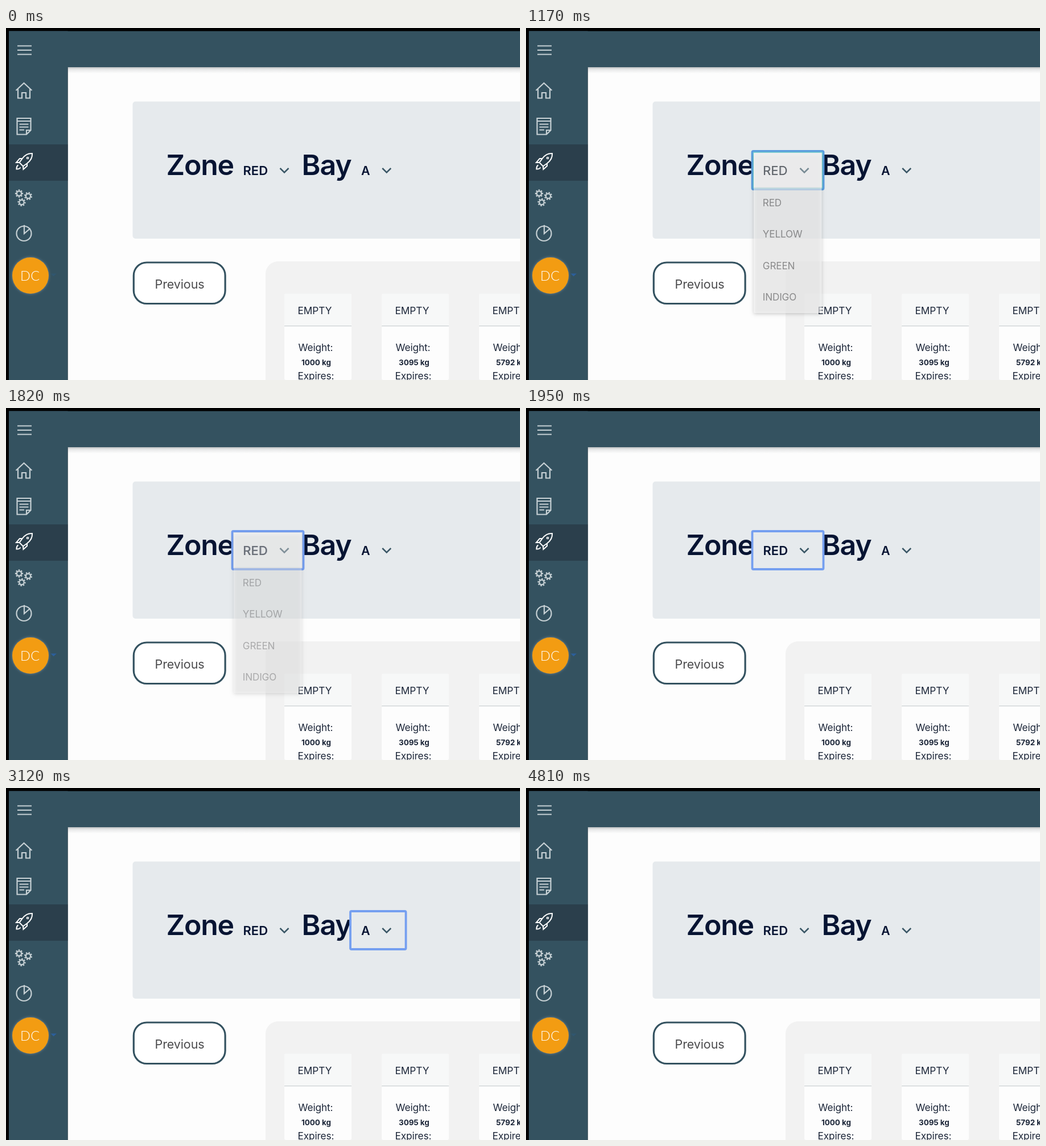
These frames come from a looping animation (903 by 620 pixels, 4940 ms). An HTML page with a canvas:

```html
<!DOCTYPE html>
<html lang="en">
<head>
<meta charset="utf-8">
<title>Zone and bay picker</title>
<style>
  html, body { margin: 0; width: 100%; height: 100%; overflow: hidden; background: #000; }
  canvas { display: block; }
</style>
</head>
<body>
<canvas id="stage" width="903" height="620"></canvas>
<script>
const ctx = document.getElementById('stage').getContext('2d');
const LOOP = 4940;
const TEAL = '#345260', NAVY = '#071433', INK = '#1b2538', ICON = '#c6d0d4', PANEL = '#e6eaed';
const SANS = 'Inter, "Open Sans", sans-serif';

function box(x, y, w, h, color, r = 0) {
  ctx.fillStyle = color;
  ctx.beginPath();
  ctx.roundRect(x, y, w, h, r);
  ctx.fill();
}

function frame(x, y, w, h, color, width, r = 0) {
  ctx.strokeStyle = color;
  ctx.lineWidth = width;
  ctx.beginPath();
  ctx.roundRect(x, y, w, h, r);
  ctx.stroke();
}

function line(d, color, width = 2) {
  ctx.strokeStyle = color;
  ctx.lineWidth = width;
  ctx.stroke(new Path2D(d));
}

function ring(x, y, r, color, width) {
  ctx.strokeStyle = color;
  ctx.lineWidth = width;
  ctx.beginPath();
  ctx.arc(x, y, r, 0, Math.PI * 2);
  ctx.stroke();
}

function text(s, x, y, size, color, weight = 400, tracking = 0, family = SANS) {
  ctx.font = `${weight} ${size}px ${family}`;
  ctx.letterSpacing = tracking + 'px';
  ctx.fillStyle = color;
  ctx.fillText(s, x, y);
}

// x is the left edge of the visible ink
function inkText(s, x, y, size, color, weight, tracking = 0, family = SANS) {
  ctx.font = `${weight} ${size}px ${family}`;
  ctx.letterSpacing = tracking + 'px';
  text(s, x + ctx.measureText(s).actualBoundingBoxLeft, y, size, color, weight, tracking, family);
}

function chevron(x) {
  line(`M${x - 7.5} 247 L${x} 254.5 L${x + 7.5} 247`, '#3c5867', 2.5);
}

function gear(x, y, turn) {
  ring(x, y, 4.1, ICON, 2.2);
  for (let i = 0; i < 8; i++) {
    const a = turn + i * Math.PI / 4, c = Math.cos(a), s = Math.sin(a);
    line(`M${x + c * 5} ${y + s * 5} L${x + c * 7.1} ${y + s * 7.1}`, ICON, 2.6);
  }
}

function icons() {
  for (const y of [31.5, 39, 46.5]) line(`M20 ${y} H45`, ICON, 2);
  line('M17.5 110 L31.5 97 L45.5 110 M21 107.5 V123.5 H28 V114 H35 V123.5 H42 V107.5', ICON, 2.2);
  line('M19.5 159 H43.5 V180 L36 187.5 H19.5 Z M19.5 164 H43.5 M36 187 V180 H43', ICON, 2.2);
  line('M23.5 169.5 H39.5 M23.5 174.5 H39.5 M23.5 179.5 H32', ICON);

  line('M46 221 C39 220.5 33 224 29 229.5 L23.5 237 L30 243.5 L37 238.5 C43 234 46.5 228 46 221 Z', '#fff');
  line('M29 230 H24 L18 237 L23.5 237 M37 238.5 V243 L30.5 249 L30 243.5', '#fff');
  line('M21.5 241.5 C18.5 243 18.5 246 18.5 248.5 C21.5 248.5 24.5 248 25.5 245.5', '#fff');
  ring(38, 229, 1.6, '#fff', 1.5);

  gear(23, 291.5, 0);
  gear(39, 296, .3);
  gear(27.5, 307, .15);

  ring(31.5, 362, 13, ICON, 2.2);
  line('M32 347 V362 L42.5 353', ICON, 2.2);
}

function sidebar(active) {
  box(5, 5.5, 103.5, 615, TEAL);
  box(5, 205, 103.5, 64, '#2b3f4c');
  icons();
  ctx.save();
  ctx.shadowColor = 'rgba(160,175,190,.6)';
  ctx.shadowBlur = 4;
  box(11, 404, 64, 64, '#f39c12', 32);
  ctx.restore();
  inkText('DC', 27, 444.7, 23.5, '#fff', 300, .5, 'Lato, sans-serif');
  ctx.fillStyle = active ? '#2c5f9c' : '#30566f';
  ctx.fill(new Path2D('M78.5 432.5 H89 L83.5 437.5 Z'));
}

function card(x, weight) {
  box(x, 468, 118, 152, '#fdfdfd', 3);
  box(x, 468, 118, 56, '#f7f8f8', 3);
  box(x, 524, 118, 1.6, '#d2d7d9');
  const tx = x + 24.5;
  inkText('EMPTY', tx, 503.5, 17.2, INK, 400);
  inkText('Weight:', tx, 569.1, 17.2, INK, 400, -.1);
  inkText(weight, tx + 5.5, 594.2, 13.4, INK, 700);
  inkText('Expires:', tx, 619.3, 17.2, INK, 400, -.1);
}

function page() {
  box(108.5, 69, 795, 551, '#fdfdfd');
  const g = ctx.createLinearGradient(0, 69, 0, 80);
  g.addColorStop(0, 'rgba(40,50,55,.3)');
  g.addColorStop(.35, 'rgba(40,50,55,.1)');
  g.addColorStop(1, 'rgba(40,50,55,0)');
  box(108.5, 69, 795, 11, g);

  box(222.5, 129.5, 700, 241.5, PANEL, 5);
  inkText('Zone', 283.5, 259, 50, NAVY, 600, -1.2);
  inkText('Bay', 522.5, 259, 50, NAVY, 600, -1);
  inkText('RED', 417.5, 258.7, 22, NAVY, 600);
  chevron(489);
  inkText('A', 624, 258.7, 21.3, NAVY, 600);
  chevron(668.7);

  box(224, 413, 161.5, 72.5, '#fff', 23);
  frame(224.3, 413, 160.8, 72.5, TEAL, 3.2, 23);
  inkText('Previous', 262.5, 458.5, 21.5, '#4b4b4d', 400, -.1);

  box(456, 411, 500, 300, '#f2f2f2', 22);
  card(489, '1000 kg');
  card(660, '3095 kg');
  card(831, '5792 kg');
}

function focus(x, w, fresh) {
  frame(x + 2, 217, w - 4, 67, fresh ? '#5b9fe0' : '#759ff0', 3.8, 2);
  if (fresh) frame(x + 4, 219, w - 8, 63, '#74d2d6', 1.6, 1);
}

function menu(alpha) {
  ctx.save();
  ctx.globalAlpha = alpha;
  ctx.save();
  ctx.shadowColor = 'rgba(0,0,0,.32)';
  ctx.shadowBlur = 6;
  ctx.shadowOffsetY = 2;
  box(400, 220, 119.5, 282, '#fdfdfd', 2);
  ctx.restore();
  box(400, 220, 119.5, 60, '#f0f0f0');
  inkText('RED', 417, 258.7, 22, '#111820', 400);
  chevron(489);
  ['RED', 'YELLOW', 'GREEN', 'INDIGO'].forEach((s, i) =>
    text(s, 415.8, 314 + i * 55.4, 17.1, '#4b4b4d', 400, -.15));
  ctx.restore();
}

function draw(t) {
  const within = (a, b) => t >= a && t < b;
  const zone = within(1040, 1300) || within(1820, 2600);
  const bay = within(2990, 4810);

  box(0, 0, 903, 620, '#000');
  box(5, 5.5, 898, 64, TEAL);
  page();
  sidebar(zone || bay || within(1300, 1820));

  if (zone) focus(395.5, 129, t < 1300);
  if (bay) focus(603, 101.5, t < 3120);
  if (within(1300, 1820)) menu(1);
  else if (within(1170, 1300)) menu(.6);
  else if (within(1820, 1950)) menu(.4);
}

const start = performance.now();
function tick(now) {
  draw(Math.max(0, now - start) % LOOP);
  requestAnimationFrame(tick);
}
draw(0);
requestAnimationFrame(tick);
</script>
</body>
</html>
```
